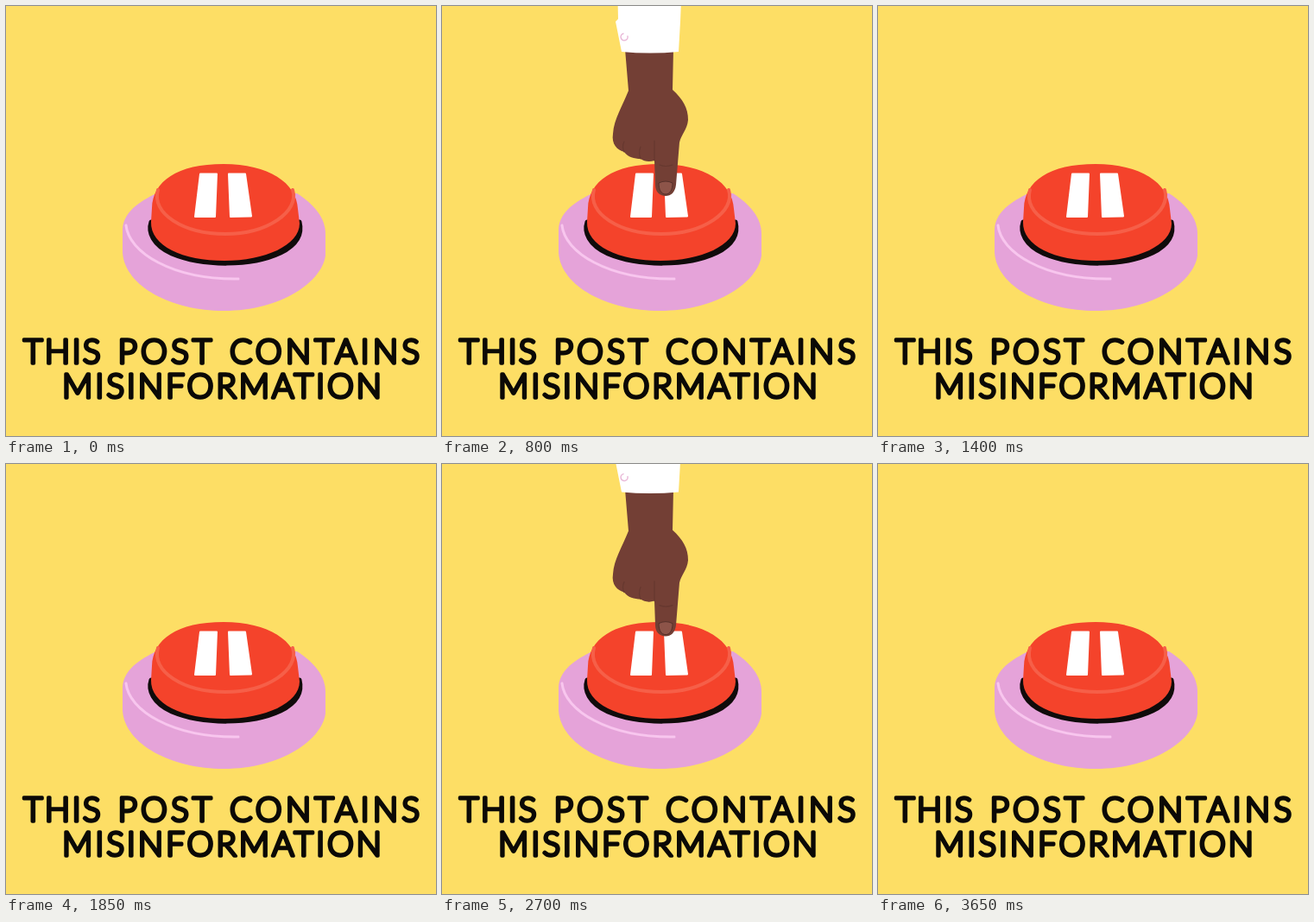
Recreate the animation shown at these times as an HTML page. Size 498x498 px, loop 3.7 s.

```html
<!DOCTYPE html>
<html lang="en">
<head>
<meta charset="utf-8">
<title>Pause button</title>
<style>
  @property --t {
    syntax: "<number>";
    inherits: true;
    initial-value: 0;
  }
  html, body {
    margin: 0;
    width: 100%;
    height: 100%;
    overflow: hidden;
    background: #fdde65;
  }
  svg { display: block; width: 498px; height: 498px; }

  /* --t counts 50 ms ticks; the hand touches down at ticks 16 and 49,
     and its height grows with the cube of the time from touchdown */
  .hand {
    --d: calc(min(max(var(--t) - 16, 16 - var(--t)), max(var(--t) - 49, 49 - var(--t))) / 11.1);
    transform: translateY(calc(var(--d) * var(--d) * var(--d) * -223px));
    animation: tick 3700ms steps(74) infinite;
  }
  @keyframes tick {
    from { --t: 0; }
    to { --t: 74; }
  }

  .line { fill: none; stroke-linecap: round; stroke-linejoin: round; }

  /* a light face under a thick round stroke gives rounded letters */
  text {
    font: 300 39px Lato, sans-serif;
    text-anchor: middle;
    fill: #0b0906;
    stroke: #0b0906;
    stroke-width: 3.6;
    stroke-linecap: round;
    stroke-linejoin: round;
  }
</style>
</head>
<body>
<svg viewBox="0 0 498 498">
  <g class="base">
    <path fill="#e5a3d9" d="M135 258C136 241 150 229 172 218L337 217C356 229 370 245 370 264V289C366 319 319 353 252 353C192 353 138 325 135 286Z"/>
    <path class="line" stroke="#f8c6ee" stroke-width="3" d="M139 254C142 285 192 317 269 316"/>
  </g>

  <g class="button">
    <path fill="#100b0b" stroke="#100b0b" stroke-width="5" stroke-linejoin="round" d="M168 250C164 262 170 277 192 287C228 302 284 302 318 286C340 275 343 262 340 250Z"/>
    <path fill="#f4432b" d="M168 250L169 234C170 203 198 183 252 183C304 183 337 205 338 235L340 252C340 277 300 295 253 295C205 295 167 278 168 250Z"/>
    <path class="line" stroke="#f65f48" stroke-width="4" d="M176 213C168 240 205 264 254 264C303 264 340 238 332 213"/>
    <g fill="#fff" stroke="#fff" stroke-width="2" stroke-linejoin="round">
      <path d="M225 194.5H244L242 244H219Z"/>
      <path d="M258 194.5H277L284 243.5L260 244Z"/>
    </g>
  </g>

  <g class="hand">
    <path fill="#733f35" d="M212 50H268L267 97C279 108 285 118 285 132C284 143 277 149 275 158L271 207C270 216 265 220 259 220C252 220 247 215 247 207L246 179C240 181 234 180 230 177C223 177 215 175 211 169C203 167 196 160 198 148C199 131 209 116 216 98Z"/>
    <path class="line" stroke="#66382f" stroke-width="1.2" d="M211 169C209 165 209 161 211 157M230 177C228 172 228 168 230 163M246 179L246 156M252 184Q259 187 267 184"/>
    <path fill="#8d5449" stroke="#56302a" stroke-width="1" d="M251 205Q259 201 267 205C267 213 264 218 259 218C254 218 251 213 251 205Z"/>
    <path fill="#fff" d="M203 -30H278L276 18L274 53Q241 56 208 53L201 18L204 15Z"/>
    <path class="line" stroke="#e9b9d8" stroke-width="1.5" d="M210 32A4 4 0 1 0 215 35"/>
  </g>

  <text x="66" y="413.8" letter-spacing="2.2">THIS</text>
  <text x="186" y="413.8" letter-spacing="4">POST</text>
  <text x="371" y="413.8" letter-spacing="4">CONTAINS</text>
  <text x="251.4" y="454" letter-spacing="2.8">MISINFORMATION</text>
</svg>
</body>
</html>
```
